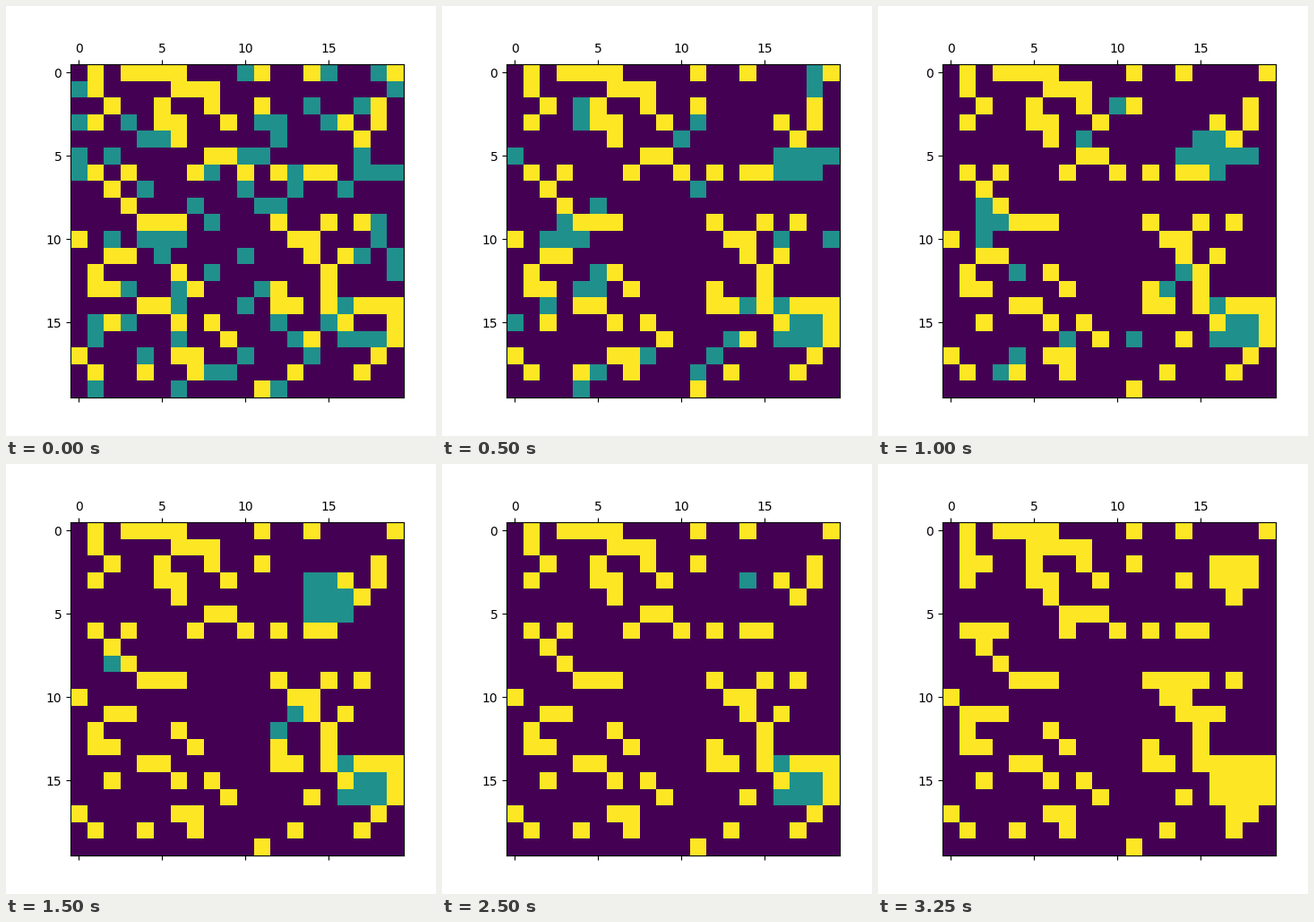
These frames come from a looping animation (480x480 px, 7750 ms). A matplotlib script:

```python
import numpy as np
import matplotlib.pyplot as plt
from matplotlib.animation import FuncAnimation

SIZE = 20
EMPTY, LIVE, WALL = 0, 1, 2
STEP_MS = 250
FRAMES = 31
DRIFT_STEPS = 10   # live cells drift and erode, then the walls close in
LAST_STEP = 13

# Occupied columns, row by row
WALLS = [
    [1, 3, 4, 5, 6, 11, 14, 19], [1, 6, 7, 8], [2, 5, 8, 11, 18],
    [1, 5, 6, 9, 16, 18], [6, 17], [8, 9], [1, 3, 7, 10, 12, 14, 15],
    [2], [3], [4, 5, 6, 12, 15, 17], [0, 13, 14], [2, 3, 14, 16],
    [1, 6, 15], [1, 2, 7, 12, 15], [4, 5, 12, 13, 15, 17, 18, 19],
    [2, 6, 8, 16, 19], [9, 14, 19], [0, 6, 7, 18], [1, 4, 7, 13, 17], [11],
]
CELLS = [
    [10, 15, 18], [0, 19], [14, 17], [0, 3, 11, 12, 15], [4, 5, 12],
    [0, 2, 10, 11, 17], [0, 8, 13, 17, 18, 19], [4, 10, 13, 16],
    [7, 11, 12], [8, 18], [2, 4, 5, 6, 18], [5, 10, 17, 19], [8, 19],
    [3, 6, 11], [6, 10, 16], [1, 3, 12, 15], [1, 6, 13, 16, 17, 18],
    [4, 10, 14], [8, 9], [1, 6, 12],
]


def initial_grid():
    grid = np.full((SIZE, SIZE), EMPTY)
    for value, rows in ((WALL, WALLS), (LIVE, CELLS)):
        for r, cols in enumerate(rows):
            grid[r, cols] = value
    return grid


def neighbours(grid):
    """East and south neighbours on a torus."""
    return np.roll(grid, -1, axis=1), np.roll(grid, -1, axis=0)


def drift(grid):
    """Majority of self, east and south; a wall defers to the other neighbour."""
    east, south = neighbours(grid)
    e_wall, s_wall = east == WALL, south == WALL
    majority = (grid + east + south >= 2).astype(int)
    return np.select(
        [(grid == WALL) | (e_wall & s_wall), e_wall, s_wall],
        [grid, south, east],
        default=majority,
    )


def close_in(grid):
    """Lone live cells and empty corners turn into wall."""
    east, south = neighbours(grid)
    lone = (grid == LIVE) & (east != LIVE) & (south != LIVE)
    corner = (grid == EMPTY) & (east == WALL) & (south == WALL)
    return np.where(lone | corner, WALL, grid)


def run():
    states = [initial_grid()]
    for n in range(LAST_STEP):
        rule = drift if n < DRIFT_STEPS else close_in
        states.append(rule(states[-1]))
    return states


states = run()

fig = plt.figure(figsize=(4.8, 4.8), dpi=100)
ax = fig.add_axes((0.15, 0.09, 0.775, 0.775))
image = ax.matshow(states[0], cmap="viridis", vmin=EMPTY, vmax=WALL)


def update(i):
    image.set_data(states[min(i, LAST_STEP)])
    return [image]


anim = FuncAnimation(fig, update, frames=FRAMES, interval=STEP_MS,
                     repeat=True, repeat_delay=0, blit=False)
plt.show()
```
